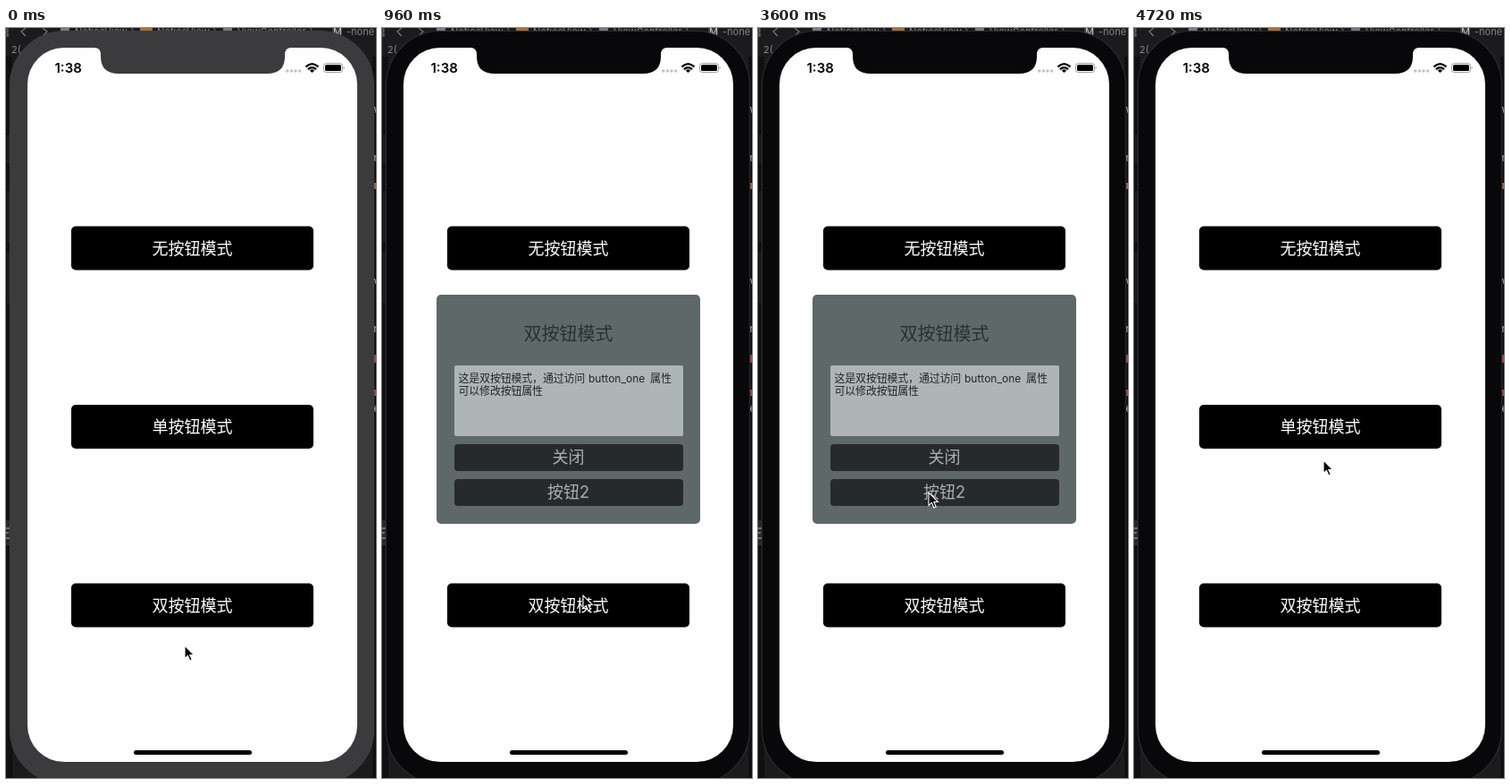
Animation of 414x838 px, one loop 4800 ms. Source, as an HTML page:

```html
<!DOCTYPE html>
<html lang="zh-CN">
<head>
<meta charset="utf-8">
<title>弹窗演示</title>
<style>
html, body { margin: 0; width: 100%; height: 100%; overflow: hidden; background: #1b1b1e; }
body, text { font-family: Inter, "Noto Sans CJK SC", "Noto Sans CJK", sans-serif; }
svg { position: absolute; left: 0; top: 0; display: block; }

/* The picture advances every 80 ms, so all motion is stepped. */
.chrome, .panel, .cursor { animation: 4.8s step-end infinite; }
.chrome { animation-name: focus; }
.panel { animation-name: popup; }
.cursor { animation-name: move; }

@keyframes focus {
  0% { --bezel: #3b3b3d; --rim: #3f3f41; }
  13.33%, 100% { --bezel: #08080a; --rim: #2b2b2f; }
}
/* --s: height and opacity, --d: content drop while closing */
@keyframes popup {
  0% { --s: 0; --d: 0; }
  13.33% { --s: .04; --d: 0; }
  15% { --s: .44; --d: 0; }
  16.66% { --s: .863; --d: 0; }
  18.33% { --s: .98; --d: 0; }
  20% { --s: 1; --d: 0; }
  88.33% { --s: .95; --d: 1; }
  90% { --s: .63; --d: 1; }
  91.66% { --s: .2; --d: 1; }
  93.33% { --s: .02; --d: 1; }
  95%, 100% { --s: 0; --d: 0; }
}
@keyframes move {
  0% { transform: translate(200px, 690px); }
  1.66% { transform: translate(213px, 662px); }
  3.33% { transform: translate(225px, 634px); }
  25% { transform: translate(225px, 626px); animation-timing-function: steps(4); }
  31.66% { transform: translate(227px, 548px); }
  40% { transform: translate(224px, 530px); animation-timing-function: steps(6); }
  50% { transform: translate(192px, 382px); }
  53.33% { transform: translate(192px, 400px); animation-timing-function: steps(5); }
  61.66% { transform: translate(191px, 519px); }
  76.66% { transform: translate(198px, 507px); }
  78.33% { transform: translate(206px, 493px); }
  80%, 100% { transform: translate(212px, 483px); }
}

.chrome { fill: var(--bezel); stroke: none; }
.chrome .rim { stroke: var(--rim); stroke-width: 1.2; }
.code { font-size: 11px; fill: #85858a; }
.label { font-size: 18px; fill: #fff; text-anchor: middle; }

.panel {
  position: absolute; left: 61px; width: 295px;
  top: calc(425.75px - 127.75px * var(--s));
  height: calc(255.5px * var(--s));
  opacity: var(--s);
  background: #5e6869; border-radius: 5px; overflow: hidden;
}
.panel > * { position: absolute; box-sizing: border-box; left: 19.5px; width: 256px; }
.title {
  top: calc(44px * var(--s) + 7px * var(--d) - 15px);
  line-height: 30px; font-size: 20px; font-weight: 500;
  text-align: center; color: #2b3031;
}
.note {
  top: calc(79px * var(--s) + 7px * var(--d));
  height: calc(79px * var(--s));
  background: #aeb5b7; border-radius: 2px; overflow: hidden;
  color: #222627; font-size: 12px; line-height: 14px;
}
.note span { position: absolute; left: 5px; top: 8px; white-space: nowrap; letter-spacing: -.2px; }
.note .word { left: 150.5px; letter-spacing: 0; }
.note .tail { left: 219.5px; letter-spacing: 0; }
.note .second { top: 21.5px; }
.button {
  top: calc(var(--y) * var(--s) + 20px * var(--d));
  height: calc(30px * var(--s)); line-height: calc(30px * var(--s));
  background: #272a2b; border-radius: 4px;
  color: #a9b0b3; text-align: center;
  font-size: calc(18px * min(1, var(--s) + var(--d)));
}
.close { --y: 167px; }
.other { --y: 206px; }
.other span { opacity: calc(1 - var(--d)); }
</style>
</head>
<body>
<svg width="414" height="838" viewBox="0 0 414 838">
  <rect width="414" height="838" fill="#1b1b1e"/>
  <path d="M0 32H7V838H0zM410 32H414V838H410z" fill="#101012"/>
  <path d="M0 550H6V578H0z" fill="#29292c"/>
  <path d="M0 559H4M0 564H3M0 570H4" stroke="#b8b8ba"/>
  <g class="code">
    <path d="M0 1H2V4H0M0 6H2V9H0M22 0L17 4L22 9M41 0L46 4L41 9" fill="none" stroke="#77777c" stroke-width="1.2"/>
    <path d="M61 0H71V8H61zM243 0H253V8H243z" fill="#747b86"/>
    <path d="M150 0H164V8H150z" fill="#a87035"/>
    <text x="77" y="8">NoticeView 〉</text>
    <text x="169" y="8">NoticeView 〉</text>
    <text x="259" y="8">ViewController 〉</text>
    <rect x="365" y="-3" width="11" height="11" rx="2" fill="#3a3a3d"/>
    <text x="366" y="8" fill="#c5c5c8">M</text>
    <text x="381" y="8">-none</text>
    <text x="6" y="28">2(</text>
  </g>
  <g class="chrome">
    <path d="M0 120Q0 118 2 118H7V152H0zM0 183Q0 181 2 181H7V240H0zM0 251Q0 249 2 249H7V308H0z" fill="#1d1d20" stroke="#070708"/>
    <rect class="rim" x="4.5" y="3.5" width="407" height="841" rx="61"/>
    <rect x="24" y="22" width="369" height="798" rx="41" fill="#fff"/>
    <path d="M99 21V22Q106 22 106 30V32Q106 51 126 51H292Q312 51 312 32V30Q312 22 319 22V21z"/>
  </g>
  <g font-size="11">
    <g fill="#b5b5b8">
      <text x="411.5" y="95">w</text>
      <text x="411.5" y="149">r</text>
      <text x="411.5" y="287">v</text>
      <text x="411.5" y="340">r</text>
      <text x="411.5" y="429">e</text>
    </g>
    <path d="M412 173H414V180H412z" fill="#9b6142"/>
    <path d="M412 365H414V374H412zM412 404H414V411H412z" fill="#9b4644"/>
  </g>

  <text x="54.5" y="50" font-size="15" font-weight="600">1:38</text>
  <path d="M314.8 48H330" stroke="#c2c2c4" stroke-width="3.4" stroke-linecap="round" stroke-dasharray="0 4.6"/>
  <g fill="none" stroke="#000" stroke-width="2.3">
    <path d="M335.5 43.4Q342.5 36.8 349.5 43.4M338 46.2Q342.5 42 347 46.2"/>
    <path d="M339.8 47.4Q342.5 45 345.2 47.4L342.5 50z" fill="#000" stroke="none"/>
  </g>
  <rect x="355.5" y="39.5" width="21" height="10" rx="2.8" fill="none" stroke="#a0a0a0"/>
  <rect x="357" y="41" width="18" height="7" rx="1.5"/>
  <path d="M377.7 42.5Q379.7 44.5 377.7 46.5z" fill="#999"/>

  <rect x="73" y="221.5" width="271" height="49" rx="5"/>
  <rect x="73" y="421" width="271" height="49" rx="5"/>
  <rect x="73" y="620.5" width="271" height="49" rx="5"/>
  <g class="label">
    <text x="208.5" y="252.5">无按钮模式</text>
    <text x="208.5" y="452">单按钮模式</text>
    <text x="208.5" y="651.5">双按钮模式</text>
  </g>
  <rect x="143" y="807" width="132" height="5" rx="2.5"/>
</svg>

<div class="panel">
  <div class="title">双按钮模式</div>
  <div class="note">
    <span>这是双按钮模式，通过访问</span>
    <span class="word">button_one</span>
    <span class="tail">属性</span>
    <span class="second">可以修改按钮属性</span>
  </div>
  <div class="button close">关闭</div>
  <div class="button other"><span>按钮2</span></div>
</div>

<svg width="414" height="838" viewBox="0 0 414 838">
  <path class="cursor" d="M0 0V14.5L3.4 11.4L5.8 17L8.2 16L5.8 10.5H10.4z" fill="#000" stroke="#fff" stroke-width="1.1"/>
</svg>
</body>
</html>
```
